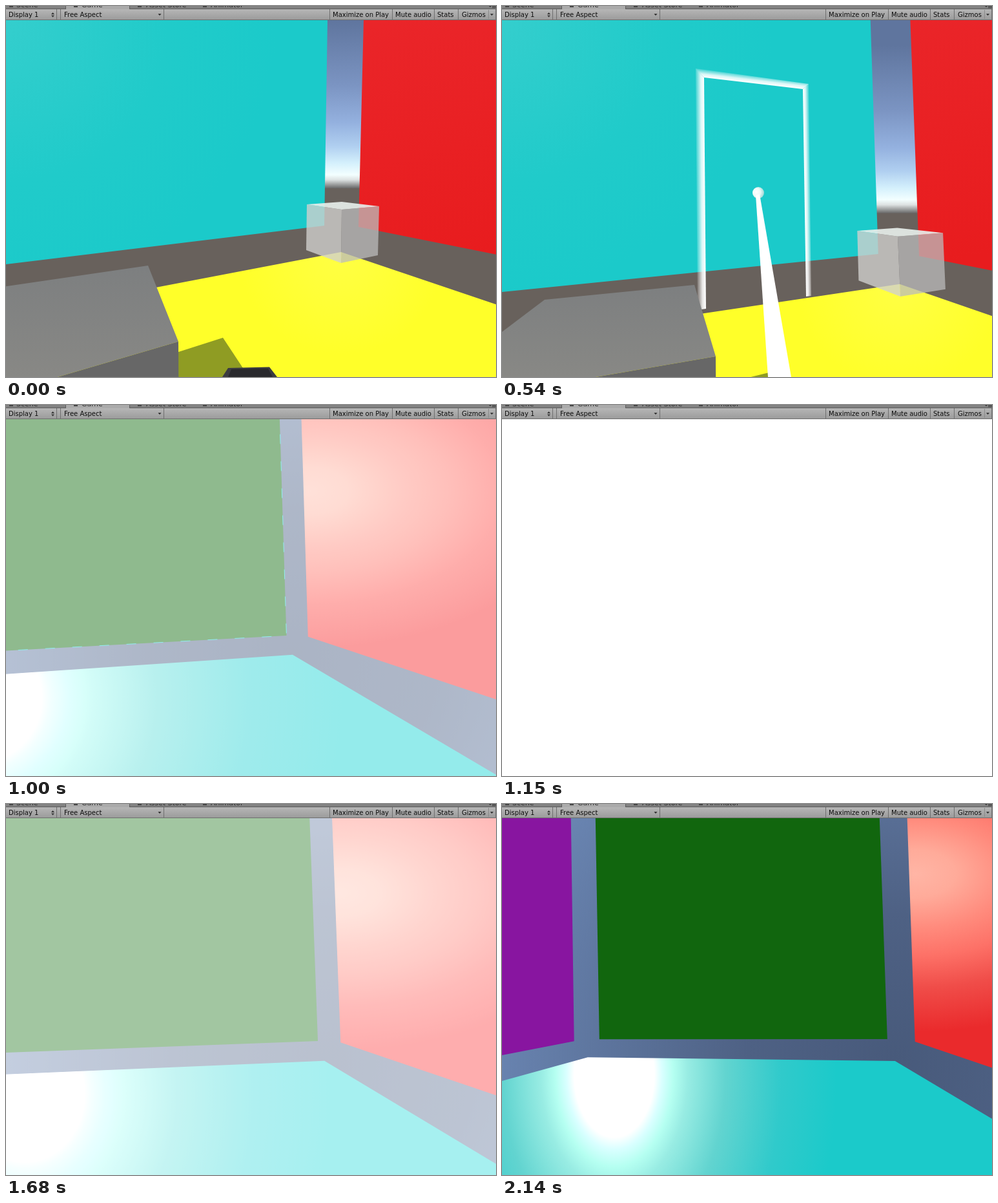
Animation of 759 by 576 pixels, one loop 2.22 s. Source, as an HTML page with a canvas:

```html
<!DOCTYPE html>
<html lang="en">
<head>
<meta charset="utf-8">
<title>Room walk</title>
<style>
html, body { margin: 0; width: 100%; height: 100%; overflow: hidden; background: #fff; }
canvas { display: block; width: 759px; height: 576px; }
</style>
</head>
<body>
<canvas id="stage" width="759" height="576"></canvas>
<script>
const W = 759, H = 576, TOP = 22, VIEW = H - TOP;
const CX = W / 2, CY = (TOP + H) / 2, FOCAL = 420, DEG = Math.PI / 180;
const LOOP = 2220, STEP = 230 / 3, HOLD = 1150, RESUME = 1600;
const ctx = document.getElementById('stage').getContext('2d');

const clamp = v => Math.max(0, Math.min(1, v));
const mix = (a, b, u) => a + (b - a) * u;
const smooth = u => u * u * (3 - 2 * u);
const spin = (a, b, r) => [a * Math.cos(r) + b * Math.sin(r), b * Math.cos(r) - a * Math.sin(r)];

// Camera that re-projects screen points: undo base pitch, then yaw, pitch and roll
function camera({ base = 0, yaw = 0, pitch = 0, roll = 0 }) {
  return ([px, py]) => {
    let x = px - CX, y = py - CY, z = FOCAL;
    [y, z] = spin(y, z, base);
    [x, z] = spin(x, z, yaw);
    [y, z] = spin(y, z, pitch);
    [y, x] = spin(y * FOCAL / z, x * FOCAL / z, roll);
    return [CX + x, CY + y];
  };
}

function poly(fill, ...pts) {
  ctx.beginPath();
  pts.forEach(p => ctx.lineTo(p[0], p[1]));
  ctx.closePath();
  ctx.fillStyle = fill;
  ctx.fill();
}

function stops(g, list) {
  list.forEach(([o, c]) => g.addColorStop(o, c));
  return g;
}
const linear = (x0, y0, x1, y1, ...list) => stops(ctx.createLinearGradient(x0, y0, x1, y1), list);
const radial = (x, y, r, ...list) => stops(ctx.createRadialGradient(x, y, 0, x, y, r), list);

// Polygon filled with an elliptical glow
function glowPoly([x, y], rx, ry, list, pts) {
  ctx.save();
  ctx.translate(x, y);
  ctx.scale(rx, ry);
  poly(radial(0, 0, 1, ...list), ...pts.map(p => [(p[0] - x) / rx, (p[1] - y) / ry]));
  ctx.restore();
}

/* ---- first room ---- */
const skyStops = [[0, '#5f759e'], [.385, '#7b94c2'], [.61, '#94b1df'], [.75, '#b0cff0'],
  [.85, '#d4f0fc'], [.92, '#f3ffff'], [.95, '#dde2e2'], [1, '#686868']];

// Glow that is sharp along a-b and fades towards oa-ob
function doorEdge(a, b, oa, ob) {
  const dx = b[0] - a[0], dy = b[1] - a[1];
  const k = ((oa[1] - a[1]) * dx - (oa[0] - a[0]) * dy) / (dx * dx + dy * dy);
  poly(linear(a[0], a[1], a[0] - dy * k, a[1] + dx * k,
    [0, '#fff'], [.4, 'rgba(255,255,255,.85)'], [1, 'rgba(255,255,255,.15)']), a, b, ob, oa);
}

function door() {
  const inner = [[316, 470], [313, 111], [466, 129], [471, 451]];
  const outer = [[303, 472], [300, 97], [475, 121], [479, 450]];
  for (let i = 0; i < 3; i++) doorEdge(inner[i], inner[i + 1], outer[i], outer[i + 1]);
}

function beam(u) {
  const x = mix(430, 396, u), y = mix(576, 294, u), w = mix(17, 3, u);
  if (u === 1) {
    ctx.beginPath();
    ctx.arc(397, 290, 9, 0, 7);
    ctx.fillStyle = radial(394, 289, 12, [0, '#fff'], [.5, '#eefaf9'], [1, '#9fd9d6']);
    ctx.fill();
  }
  poly('#fff', [x - w, y], [x + w, y - 2], [448, 576], [412, 576]);
}

function cube(see) {
  const [left, back, right, front] = [[466, 308], [520, 304], [578, 311], [520, 316]].map(see);
  const [lowLeft, lowFront, lowRight] = [[465, 379], [519, 399], [576, 387]].map(see);
  poly('rgba(208,208,206,.79)', left, front, lowFront, lowLeft);
  poly('rgba(187,187,187,.75)', front, right, lowRight, lowFront);
  poly('rgba(230,237,234,.92)', left, back, right, front);
}

// The near box drifts against the far walls
function box(u) {
  const at = (x0, y0, x1, y1) => [mix(x0, x1, u), mix(y0, y1, u)];
  const backL = at(-19, 438, 66, 456), backR = at(220, 403, 298, 433);
  const nearR = at(267, 521, 331, 544), nearL = at(-260, 676, -162, 629);
  poly(linear(0, backR[1], 0, H, [0, '#7d7f80'], [1, '#888885']), backL, backR, nearR, nearL);
  poly('#676767', nearR, [nearR[0] + 1, 700], [nearL[0], 700], nearL);
}

function gun(drop) {
  ctx.save();
  ctx.translate(0, drop);
  poly('#3b3b40', [335, 576], [344, 562], [408, 560.5], [420, 576]);
  poly('#29292d', [344, 576], [349, 564], [406, 563], [413, 576]);
  ctx.restore();
}

function hall(t) {
  const u = clamp(t / 540), base = 2.2 * DEG;
  const see = camera({ base, yaw: 10.3 * DEG * u, pitch: mix(-base, 3.4 * DEG, u), roll: -.6 * DEG * u });
  const [wallTop, wallLow, redTop, redLow, corner] =
    [[501.5, -200], [493, 341], [559.5, -200], [546, 343], [519, 382]].map(see);
  const horizon = see([520, 283])[1];

  ctx.fillStyle = '#68615c';
  ctx.fillRect(0, TOP, W, 700);
  ctx.fillStyle = linear(0, horizon - 261, 0, horizon, ...skyStops);
  ctx.fillRect(wallLow[0] - 40, TOP, 150, horizon - TOP);

  poly(radial(0, TOP, 420, [0, '#34cecd'], [.6, '#20cbca'], [1, '#1bcaca']),
    see([-400, -200]), wallTop, wallLow, see([-400, 449.7]));
  poly(linear(600, TOP, 680, 400, [0, '#ea2529'], [1, '#e81c1e']),
    redTop, see([900, -500]), see([900, 414]), redLow);
  poly(radial(...corner, 160, [0, '#ffff44'], [1, '#ffff29']),
    corner, ...[[900, 511], [900, 900], [-400, 900], [-400, 558]].map(see));
  poly('#8f9c23', ...[[205, 557], [336, 515], [392, 600], [205, 600]].map(see));

  if (t >= 460) {
    ctx.save();
    ctx.translate((u - 1) * 88, (u - 1) * 45);
    door();
    ctx.restore();
  }
  box(u);
  cube(see);
  gun(u * 22);
  if (t >= 390) beam(clamp((t - 310) / 150));
}

/* ---- second room ---- */
const floorStops = [[0, '#fff'], [.18, '#fff'], [.215, '#d9ffff'], [.265, '#b5fff1'],
  [.33, '#98ece3'], [.5, '#62d4d0'], [.75, '#30cacb'], [1, '#1bcaca']];
const redStops = [[0, '#ffb5a5'], [.15, '#ffab9a'], [.35, '#ff8a7c'], [.52, '#fd7167'],
  [.72, '#f04d49'], [1, '#ea2a2c']];

// Slow drift while the light flares, then a turn that speeds up
function roomCamera(t) {
  if (t < RESUME) {
    const u = ((t - 850) / 750) ** 1.6;
    return camera({ yaw: mix(-20.5, -14.35, u) * DEG, pitch: mix(-.7, 9.4, u) / FOCAL });
  }
  const u = clamp((t - RESUME) / 540);
  return camera({ yaw: -14.35 * DEG * (1 - u ** 1.57), pitch: 9.4 * (1 - u ** 1.25) / FOCAL });
}

function room(t) {
  const see = roomCamera(t);
  const shape = pts => pts.map(see);
  const green = shape([[143.5, -120], [581, -120], [598, 365], [152, 365]]);
  const floor = shape([[134, 393], [610, 399], [1600, 990], [-300, 990], [-300, 513]]);
  const hot = see([175, 420]);

  ctx.fillStyle = radial(...floor[1], 760, [0, '#485a7b'], [.3, '#4e6184'], [1, '#7290c0']);
  ctx.fillRect(0, TOP, W, VIEW);
  poly('#8815a0', ...shape([[106, -120], [113, 368], [-300, 449], [-300, -120]]));
  poly('#11660e', ...green);
  if (t < HOLD) {
    ctx.strokeStyle = '#14cfd0';
    ctx.lineWidth = 1;
    ctx.setLineDash([15, 27]);
    ctx.beginPath();
    green.slice(1).forEach(q => ctx.lineTo(...q));
    ctx.stroke();
    ctx.setLineDash([]);
  }
  glowPoly(see([641, 108]), 420, 245, redStops,
    shape([[624, -120], [1600, -900], [1600, 694], [641, 369]]));
  const spread = 1 + ((hot[0] - CX) / FOCAL) ** 2;
  glowPoly(hot, 278 * spread, 540, floorStops, floor);
}

function flare(t) {
  const a = t < RESUME ? clamp((t - 850) / 300) : .85 * clamp(1 - (t - RESUME) / 240);
  const glow = Math.round(13 * a);
  ctx.fillStyle = `rgba(255,255,255,${a})`;
  ctx.fillRect(0, TOP, W, VIEW);
  ctx.globalCompositeOperation = 'lighter';
  ctx.fillStyle = `rgb(${glow},${glow},${glow})`;
  ctx.fillRect(0, TOP, W, VIEW);
}

/* ---- editor bar ---- */
function rect(fill, x, y, w, h) {
  ctx.fillStyle = fill;
  ctx.fillRect(x, y, w, h);
}

function label(text, x, y, size) {
  ctx.font = size + 'px "DejaVu Sans", sans-serif';
  ctx.fillText(text, x, y);
}

function bar() {
  const line = '#6f6f6f', ink = '#333';
  rect('#828282', 0, 0, W, 5);
  rect('#5c5c5c', 0, 4, W, 1);
  rect('#5c5c5c', 92, 0, 100, 5);
  rect('#ababab', 93, 0, 98, 5);
  rect(linear(0, 5, 0, 21, [0, '#b6b6b6'], [1, '#9c9c9c']), 0, 5, W, 17);
  rect(line, 0, 21, W, 1);
  [78, 84, 244, 501, 598, 663, 700, 758].forEach(x => rect(line, x, 5, 1, 16));
  rect('#8a8a8a', 747, 6, 1, 14);

  ctx.fillStyle = '#0c0c0c';
  [['Display 1', 4], ['Free Aspect', 90], ['Maximize on Play', 506], ['Mute audio', 603],
    ['Stats', 668], ['Gizmos', 706]].forEach(([s, x]) => label(s, x, 17, 10));
  ctx.fillStyle = '#2a2a2a';
  [['Scene', 16], ['Game', 117], ['Asset Store', 217], ['Animator', 317]]
    .forEach(([s, x]) => label(s, x, 2, 11));
  [5, 105, 204, 305].forEach(x => rect('#444', x, 0, 6, 2));

  poly(ink, [70, 13], [75, 13], [72.5, 10]);
  poly(ink, [70, 14.5], [75, 14.5], [72.5, 17.5]);
  [238, 752.5].forEach(x => poly(ink, [x - 2.5, 12], [x + 2.5, 12], [x, 15]));
  poly(ink, [748, 0], [752, 0], [750, 2]);
  [0, 2].forEach(y => rect(ink, 753, y, 6, 1));
}

function draw(t) {
  ctx.save();
  ctx.beginPath();
  ctx.rect(0, TOP, W, VIEW);
  ctx.clip();
  if (t <= 540) {
    hall(t);
  } else if (t < 850) {
    // the view tips upward from one room into the other
    ctx.translate(0, smooth((t - 540) / 310) * VIEW);
    hall(540);
    ctx.translate(0, -VIEW);
    room(850);
  } else {
    room(t);
    flare(t);
  }
  ctx.restore();
  bar();
}

// The picture refreshes in steps and rests while it is white
function tick(now) {
  const k = Math.floor((now < RESUME ? Math.min(now, HOLD) : now - RESUME) / STEP + 1e-6);
  return now < RESUME ? Math.ceil(k * STEP / 10 - 1e-6) * 10 : RESUME + Math.ceil(k * STEP);
}

const start = performance.now();
function loop() {
  draw(tick((performance.now() - start) % LOOP));
  requestAnimationFrame(loop);
}
loop();
</script>
</body>
</html>
```
